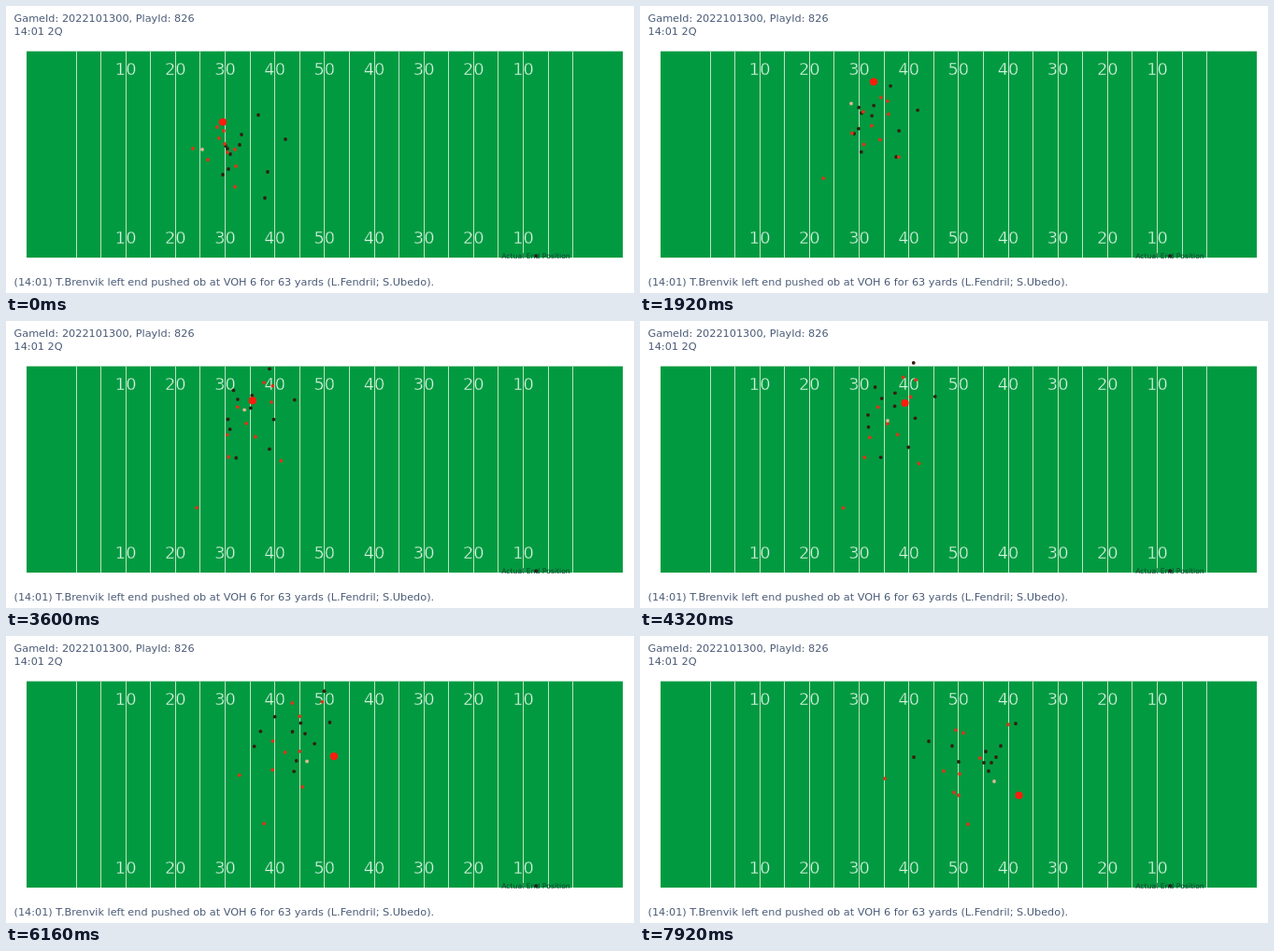
Animation of 672x308 px, one loop 8 s. Source, as an HTML page:

```html
<!DOCTYPE html>
<html lang="en">
<head>
<meta charset="utf-8">
<title>Play tracking</title>
<style>
html, body { margin: 0; width: 100%; height: 100%; overflow: hidden; background: #fff; }
svg { display: block; width: 672px; height: 308px; font-family: Verdana, "DejaVu Sans", sans-serif; }
.info { font-size: 11.28px; fill: #4b5b76; }
.yard { font-size: 17.8px; fill: #d9f3e1; stroke: #029a40; stroke-width: .4px; text-anchor: middle; }
.end { font-size: 7.7px; fill: #14402f; text-anchor: middle; }
</style>
</head>
<body>
<svg id="stage" viewBox="0 0 672 308">
  <text class="info" x="8.5" y="17">GameId: 2022101300, PlayId: 826</text>
  <text class="info" x="8.5" y="31">14:01 2Q</text>
  <rect x="22" y="48.6" width="638" height="221.4" fill="#029a40"/>
  <g id="field"></g>
  <circle cx="567.3" cy="268.3" r="2" fill="#241c16"/>
  <text class="end" x="567" y="270.8">Actual End Position</text>
  <g id="players"></g>
  <text class="info" x="8.5" y="299.5">(14:01) T.Brenvik left end pushed ob at VOH 6 for 63 yards (L.Fendril; S.Ubedo).</text>
</svg>
<script>
const TICK = 80, LOOP = 8000;
const TURN = 28, LAST = 79; // samples: play turns upfield, last sample
const DARK = '#33200f', RED = '#dc3519';

// Each unit shares a first flow; each player is [start x, start y, end x, end y]
const units = [
  { color: DARK, flow: [2, -65], fade: 5, players: [
    [237, 153, 334, 118], [240, 159, 368, 136], [232, 181, 309, 113],
    [280, 178, 376, 136], [277, 206, 341, 135]] },
  { color: DARK, flow: [6, -46], fade: 7, players: [
    [270, 117, 402, 94], [252, 138, 370, 124], [250, 149, 381, 130], [299, 143, 386, 118]] },
  { color: DARK, flow: [2, -27], fade: 3, players: [
    [238, 175, 373, 145], [235, 150, 293, 130]] },
  { color: RED, flow: [47, -47], fade: 0, players: [
    [233, 134, 394, 95], [234, 148, 346, 104], [226, 130, 338, 101], [245, 194, 341, 171]] },
  { color: RED, flow: [16, -42], fade: 0, players: [
    [228, 142, 325, 145], [237, 157, 342, 148], [216, 165, 336, 168], [246, 172, 364, 131]] },
  { color: RED, flow: [-8, -8], fade: 0, players: [[245, 154, 262, 153]] },
  { color: RED, flow: [-3, 47], fade: 2, players: [[200, 153, 351, 202]] }
];

// Key points of the two routes that lead the play
const KNOTS = [0, 10, 28, 43, 54, 70, 79];
const runner = [[232, 124.5], [252.5, 82.5], [249, 87], [283.5, 88], [325, 119], [376, 140], [405.5, 171]];
const trailer = [[210, 154], [209, 127], [245, 90], [265, 107], [295, 129], [350, 139.5], [379, 156]];

const $ = id => document.getElementById(id);
const lerp = (a, b, u) => a + (b - a) * u;

function add(parent, tag, attrs, text) {
  const el = document.createElementNS('http://www.w3.org/2000/svg', tag);
  for (const k in attrs) el.setAttribute(k, attrs[k]);
  if (text) el.textContent = text;
  parent.appendChild(el);
  return el;
}

function drawField() {
  const yardX = yards => 75 + yards * 5.317;
  for (let y = 0; y <= 100; y += 5) {
    const x = Math.floor(yardX(y)) + 0.5;
    add($('field'), 'line', { x1: x, x2: x, y1: 48.6, y2: 270, stroke: '#b9e4c8', 'stroke-width': 1 });
  }
  for (let y = 10; y < 100; y += 10) {
    for (const base of [74, 255]) {
      add($('field'), 'text', { class: 'yard', x: yardX(y), y: base }, 50 - Math.abs(50 - y));
    }
  }
}

// Flow sideways first, then accelerate upfield along an arc
function pursue([x0, y0, x2, y2], [dx, dy], fade, f) {
  const x1 = x0 + dx, y1 = y0 + dy;
  if (f < TURN) {
    const u = f / TURN;
    return [lerp(x0, x1, u) - fade * Math.sin(Math.PI * u), lerp(y0, y1, u)];
  }
  const u = (f - TURN) / (LAST - TURN);
  const arc = Math.max(0, 150 - y1) * 0.45;
  return [lerp(x1, x2, u ** 1.65), lerp(y1, y2, u) - arc * Math.sin(Math.PI * u ** 0.8)];
}

// Cubic Hermite through key points, tangents from the neighbours
function along(points, f) {
  const last = KNOTS.length - 1;
  let i = 0;
  while (i < last - 1 && f >= KNOTS[i + 1]) i++;
  const h = KNOTS[i + 1] - KNOTS[i], u = (f - KNOTS[i]) / h, v = 1 - u;
  return [0, 1].map(axis => {
    const slope = n => {
      const a = Math.max(n - 1, 0), b = Math.min(n + 1, last);
      return (points[b][axis] - points[a][axis]) / (KNOTS[b] - KNOTS[a]);
    };
    return v * v * ((1 + 2 * u) * points[i][axis] + u * h * slope(i)) +
           u * u * ((1 + 2 * v) * points[i + 1][axis] - v * h * slope(i + 1));
  });
}

const dots = [];
function addDot(fill, r, at) {
  dots.push({ el: add($('players'), 'circle', { r, fill }), at });
}

function addUnits(color) {
  for (const { flow, fade, players } of units.filter(u => u.color === color)) {
    for (const p of players) addDot(color, 1.9, f => pursue(p, flow, fade, f));
  }
}

drawField();
addUnits(DARK);
addDot('#fb1d0c', 4.1, f => along(runner, f));
addUnits(RED);
addDot('#dfb796', 1.9, f => along(trailer, f));

function render(ms) {
  const tick = Math.floor((ms % LOOP) / TICK);
  const f = tick - Math.floor((tick + 2) / 5); // every fifth tick holds
  for (const { el, at } of dots) {
    const [x, y] = at(f);
    el.setAttribute('cx', x.toFixed(2));
    el.setAttribute('cy', y.toFixed(2));
  }
}

const start = performance.now();
function loop() {
  render(performance.now() - start);
  requestAnimationFrame(loop);
}
loop();
</script>
</body>
</html>
```
